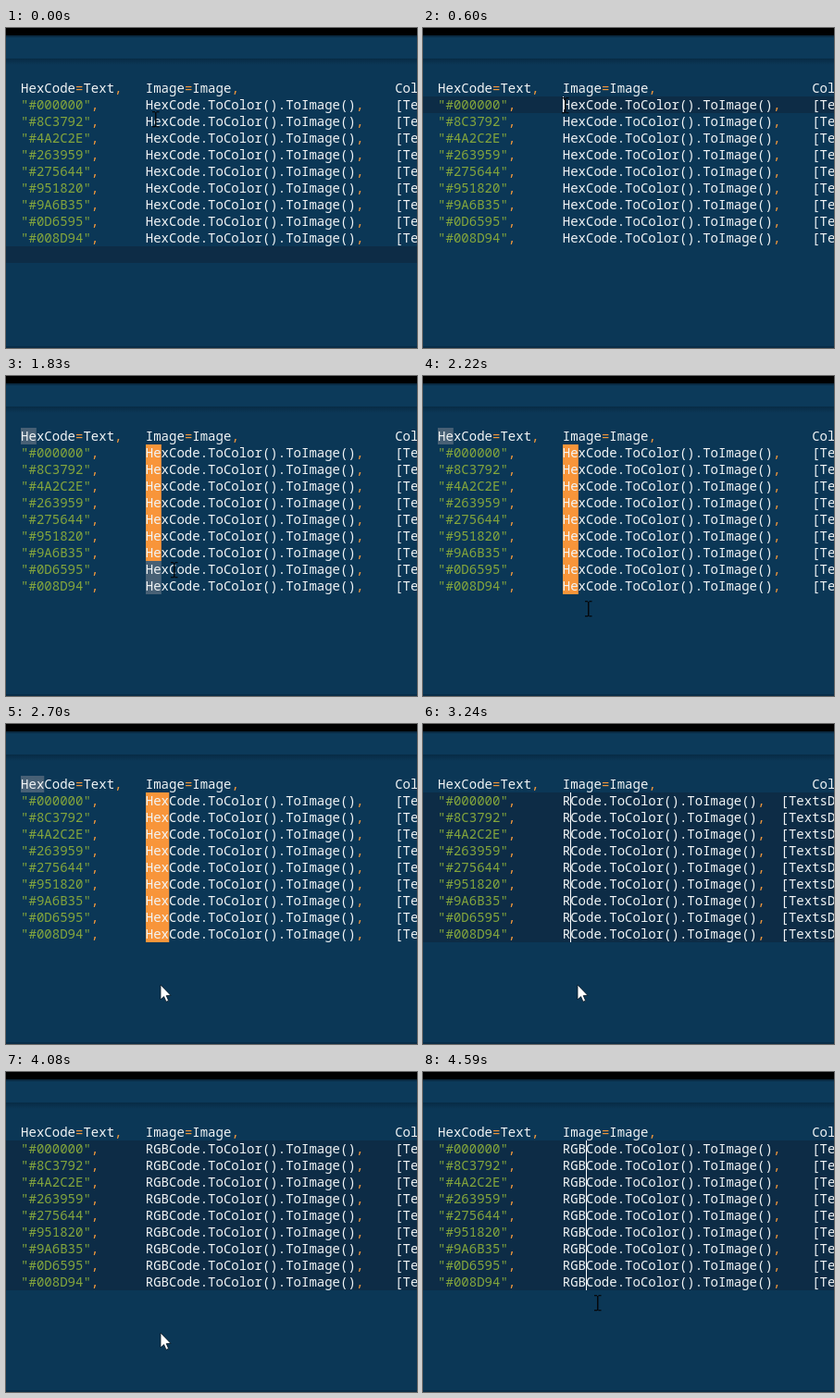
Write an HTML page with a canvas that moves like this. It is 444 px wide and 346 px high and loops after 4620 ms.

```html
<!DOCTYPE html>
<html lang="en">
<head>
<meta charset="utf-8">
<title>Multi-line editing</title>
<style>
  html, body { margin: 0; width: 100%; height: 100%; overflow: hidden; background: #0b3756; }
  canvas { display: block; }
</style>
</head>
<body>
<canvas id="stage" width="444" height="346"></canvas>
<script>
const ctx = document.getElementById('stage').getContext('2d');
const W = 444, H = 346, LOOP = 4620, STEP = 30;
const FONT_SIZE = 14.03, CELL = FONT_SIZE * 0.6, ROW = 18;
const LEFT = 16.1, TOP = 74, IMAGE_COL = 16, LAST_COL = 48;
const COLOR = {
  back: '#0b3756', band: '#0d2c46', text: '#f2f5f6', string: '#84a63c',
  mark: '#f5993b', select: '#f8953a', match: '#476075'
};
const codes = ['#000000', '#8C3792', '#4A2C2E', '#263959', '#275644',
               '#951820', '#9A6B35', '#0D6595', '#008D94'];

const CLICK = 570, DRAG = 750, TYPE = [3090, 3300, 3480], BLINK = 530;
const pointerPath = [
  [0, 161, 99], [240, 158, 94], [480, 153, 84], [660, 153, 84], [1110, 179, 139],
  [1500, 180, 176], [1830, 181, 210], [2160, 181, 245], [2490, 167, 282],
  [4380, 167, 282], [4560, 188, 250], [LOOP, 188, 250]
];

const colX = col => LEFT + col * CELL;
const rowY = row => TOP + row * ROW;

function rect(x, y, w, h, color) {
  ctx.fillStyle = color;
  ctx.fillRect(x, y, w, h);
}

// Draws [text, color] runs one after another and returns the end column.
function write(col, row, ...runs) {
  for (const [text, color] of runs) {
    ctx.fillStyle = color;
    ctx.fillText(text, colX(col), rowY(row) + 13.6);
    col += text.length;
  }
  return col;
}

function pointerAt(t) {
  const i = pointerPath.findIndex(p => p[0] > t);
  const [t0, x0, y0] = pointerPath[i - 1], [t1, x1, y1] = pointerPath[i];
  const k = (t - t0) / (t1 - t0);
  return [Math.round(x0 + (x1 - x0) * k), Math.round(y0 + (y1 - y0) * k)];
}

function drawWindow() {
  rect(0, 0, W, H, COLOR.back);
  const shade = ctx.createLinearGradient(0, 33, 0, 40);
  shade.addColorStop(0, '#082b45');
  shade.addColorStop(1, COLOR.back);
  rect(0, 33, W, 7, shade);
  rect(0, 8, W, 25, '#0c3a5a');
  rect(0, 8, W, 2, '#092b43');
  rect(0, 0, W, 8, '#000');
  rect(0, 344, W, 2, '#092d48');
}

function drawHighlights(t, typed) {
  if (typed) return rect(0, TOP, W, ROW * 9, COLOR.band);
  if (t < CLICK) return rect(0, rowY(10) - ROW, W, ROW, COLOR.band);
  if (t < DRAG) return rect(0, TOP, W, ROW, COLOR.band);
  const rows = Math.min(9, 1 + Math.floor((t - DRAG) / 180));
  const chars = t < 1440 ? 1 : t < 2280 ? 2 : 3;
  const width = chars * CELL;
  const x = Math.round(colX(IMAGE_COL));
  if (chars > 1) {
    rect(16, rowY(-1), width, ROW, COLOR.match);
    rect(x, rowY(rows), width, (9 - rows) * ROW, COLOR.match);
  }
  rect(x, TOP, width, rows * ROW, COLOR.select);
}

function drawText(typed) {
  const { text, mark, string } = COLOR;
  const comma = [',', mark];
  const field = (col, name, type) =>
    write(col, -1, [name, text], ['=', mark], [type, text], comma);
  field(0, 'HexCode', 'Text');
  field(IMAGE_COL, 'Image', 'Image');
  write(LAST_COL, -1, ['Color', text]);

  const prefix = typed ? 'RGB'.slice(0, typed) : 'Hex';
  codes.forEach((code, row) => {
    write(0, row, [`"${code}"`, string], comma);
    const end = write(IMAGE_COL, row, [prefix + 'Code.ToColor().ToImage()', text], comma);
    const tabStop = (Math.floor(end / 4) + 1) * 4;
    write(tabStop, row, ['[TextsData', text]);
  });
}

function drawCaret(t, typed) {
  const since = typed ? t - TYPE[typed - 1] : t - CLICK;
  if (since < 0 || (!typed && t >= DRAG) || Math.floor(since / BLINK) % 2) return;
  const x = Math.round(colX(IMAGE_COL + typed));
  rect(x, TOP, 1, typed ? ROW * 9 : ROW, '#fff');
}

function drawBeam(x, y) {
  rect(x, y - 8, 1.5, 16, '#05090d');
  for (const end of [-9, 7]) {
    rect(x - 3, y + end, 3, 1.3, '#05090d');
    rect(x + 1.5, y + end, 3, 1.3, '#05090d');
  }
}

function drawArrow(x, y) {
  const outline = [[0, 0], [0, 16], [3.6, 12.7], [6, 18.3], [8.6, 17.2], [6.2, 11.7], [11, 11.5]];
  ctx.beginPath();
  for (const [dx, dy] of outline) ctx.lineTo(x + dx, y + dy);
  ctx.closePath();
  ctx.fillStyle = '#fff';
  ctx.fill();
  ctx.strokeStyle = '#061523';
  ctx.lineWidth = 0.8;
  ctx.stroke();
}

function draw(t) {
  const typed = TYPE.filter(at => t >= at).length;
  ctx.font = `${FONT_SIZE}px "Noto Sans Mono", monospace`;
  drawWindow();
  drawHighlights(t, typed);
  drawText(typed);
  drawCaret(t, typed);
  const [x, y] = pointerAt(t);
  (y > 262 ? drawArrow : drawBeam)(x, y);
}

const start = performance.now();
function tick() {
  const elapsed = (performance.now() - start) % LOOP;
  draw(Math.floor(elapsed / STEP) * STEP);
  requestAnimationFrame(tick);
}
tick();
</script>
</body>
</html>
```
